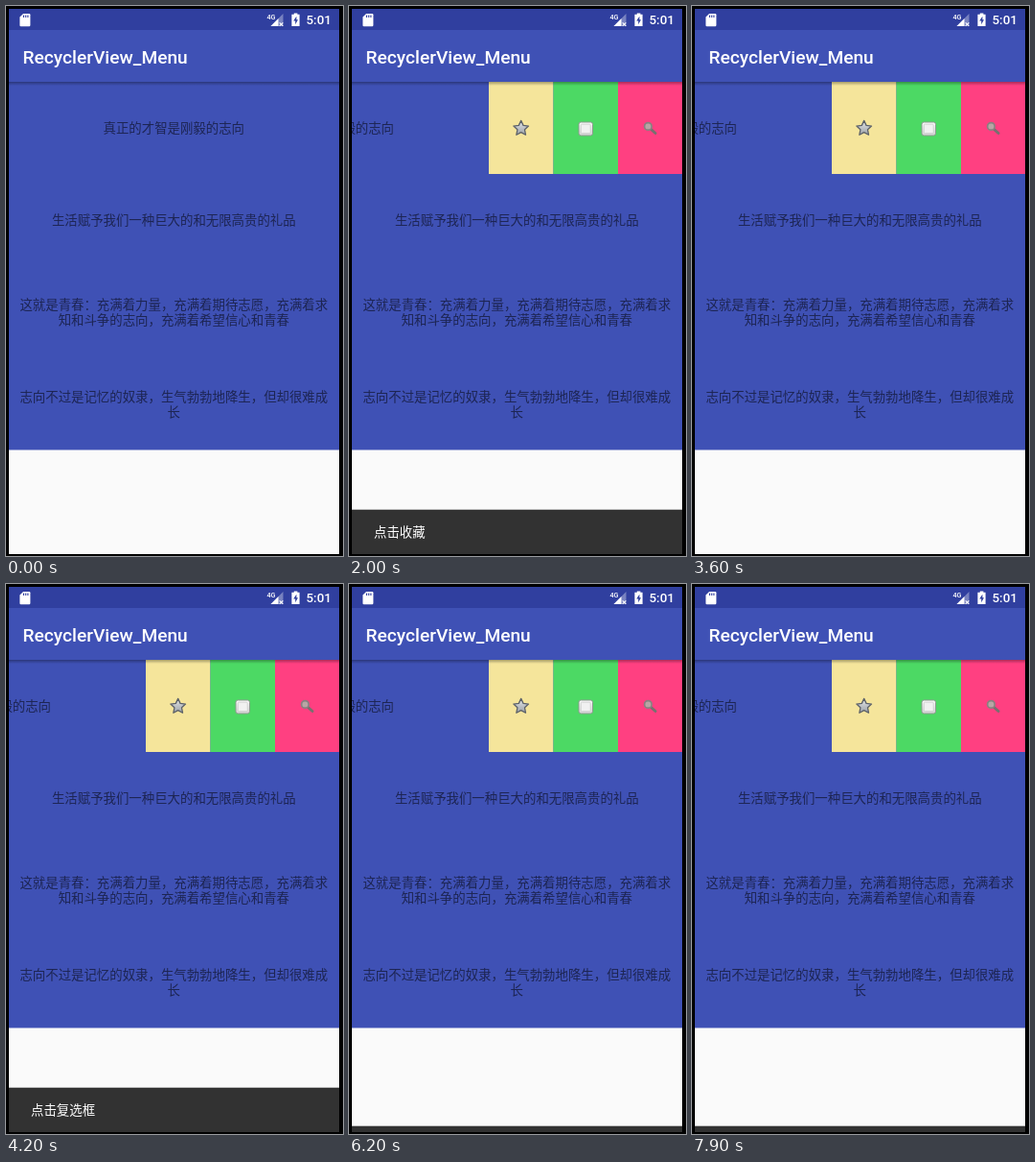
Animation, 352 px wide and 573 px high, one loop 8000 ms. Source, as an HTML page:

```html
<!DOCTYPE html>
<html lang="zh-CN">
<head>
<meta charset="utf-8">
<style>
  html, body { margin: 0; width: 100%; height: 100%; overflow: hidden; background: #000; }
  svg { display: block; }
  text { font-family: Roboto, "Noto Sans CJK SC", "Noto Sans CJK", sans-serif; }
  .item { font-size: 13.42px; fill: #1d2553; text-anchor: middle; }
  .bar { fill: #fff; font-weight: 500; }
</style>
</head>
<body>
<svg width="352" height="573" viewBox="0 0 352 573">
  <defs>
    <clipPath id="screen"><rect x="3" y="3" width="345" height="568"/></clipPath>
    <linearGradient id="shade" x2="0" y2="1">
      <stop offset="0" stop-color="#000" stop-opacity=".32"/>
      <stop offset="1" stop-color="#000" stop-opacity="0"/>
    </linearGradient>
    <linearGradient id="metal" x2="0" y2="1">
      <stop offset="0" stop-color="#e4e6e8"/>
      <stop offset="1" stop-color="#9ba1a8"/>
    </linearGradient>
    <linearGradient id="box" x2="0" y2="1">
      <stop offset="0" stop-color="#fafafa"/>
      <stop offset="1" stop-color="#d2d2d2"/>
    </linearGradient>
  </defs>
  <rect width="352" height="573"/>
  <g clip-path="url(#screen)">
    <rect x="3" y="3" width="345" height="568" fill="#fafafa"/>
    <rect x="3" y="79" width="345" height="383.5" fill="#3f51b5"/>

    <g id="row">
      <text class="item" x="175.3" y="132.2">真正的才智是刚毅的志向</text>
      <g transform="translate(348 79)">
        <rect width="67.5" height="96" fill="#f5e59b"/>
        <rect x="67.5" width="67.5" height="96" fill="#4cd964"/>
        <rect x="135" width="68" height="96" fill="#ff4081"/>
        <path id="star" fill="url(#metal)" stroke="#5d6268" stroke-width="1.3" stroke-linejoin="round"/>
        <rect x="94" y="42" width="14.5" height="14" rx="2.2" fill="url(#box)" stroke="#8b9a8e"/>
        <rect x="96.3" y="44.2" width="9.9" height="9.4" rx="1" fill="#f1f1f1" stroke="#c9c9c9" stroke-width=".7"/>
        <path d="M169.5 49.5L174 53.5" stroke="#77706f" stroke-width="3" stroke-linecap="round"/>
        <circle cx="166.4" cy="46.4" r="3.8" fill="#b9a5a5" stroke="#8a8080" stroke-width="1.7"/>
      </g>
    </g>

    <text class="item" x="175.3" y="228.2">生活赋予我们一种巨大的和无限高贵的礼品</text>
    <text class="item" x="175.3" y="316">这就是青春：充满着力量，充满着期待志愿，充满着求</text>
    <text class="item" x="175.3" y="331.8">知和斗争的志向，充满着希望信心和青春</text>
    <text class="item" x="175.3" y="411.8">志向不过是记忆的奴隶，生气勃勃地降生，但却很难成</text>
    <text class="item" x="175.3" y="427.8">长</text>

    <rect x="3" y="79" width="345" height="4" fill="url(#shade)"/>
    <rect x="3" y="25" width="345" height="54" fill="#3f51b5"/>
    <rect x="3" y="3" width="345" height="22" fill="#303f9f"/>
    <text class="bar" x="17.5" y="60" font-size="19.17">RecyclerView_Menu</text>

    <path d="M18 8H24.2Q25.4 8 25.4 9.2V20Q25.4 21.2 24.2 21.2H15.6Q14.4 21.2 14.4 20V11.6Z" fill="#fff"/>
    <path d="M18.5 9.5V12M20.7 9.5V12M22.9 9.5V12" stroke="#303f9f" stroke-width="1.1"/>
    <path d="M276.5 21L289.5 8V21Z" fill="#fff" opacity=".35"/>
    <path d="M276.5 21L284.5 13V21Z" fill="#fff"/>
    <path d="M285.7 17.3L289.3 20.9M289.3 17.3L285.7 20.9" stroke="#fff" stroke-width="1.1"/>
    <text class="bar" x="272.5" y="13.5" font-size="7.2">4G</text>
    <path d="M300.8 7.4H304.4V8.8H306.6V21H298.4V8.8H300.8Z" fill="#fff"/>
    <path d="M303.4 10.8L300.2 15.6H302.2V19.2L305 14.2H303.4Z" fill="#303f9f"/>
    <text class="bar" x="313.5" y="19" font-size="13.42">5:01</text>

    <g id="snack">
      <rect x="3" y="524.7" width="345" height="47" fill="#323232"/>
      <text id="note" x="26" y="553" font-size="13.42" fill="#fff"></text>
    </g>
  </g>
</svg>
<script>
const LOOP = 8000, HIDDEN = 47;
const $ = id => document.getElementById(id);
const row = $("row"), snack = $("snack"), note = $("note");

$("star").setAttribute("d", "M" + Array.from({ length: 10 }, (_, i) => {
  const r = i % 2 ? 4 : 8.2, a = i * Math.PI / 5;
  return (33.7 + r * Math.sin(a)).toFixed(2) + " " + (48.6 - r * Math.cos(a)).toFixed(2);
}).join("L") + "Z");

// [time, row offset]
const swipe = [[0, 0], [700, -42], [800, -118], [900, -184], [1000, -202]];

// [show time, hide time, message]
const notes = [
  [1800, 3400, "点击收藏"],
  [4000, 5600, "点击复选框"],
  [6200, 7800, "点击搜索"]
];

// [time, bar offset, text opacity, message]
const bar = [[0, HIDDEN, 0, ""]];
for (const [show, hide, msg] of notes) bar.push(
  [show, 40, 0, msg],
  [show + 100, 6, 0.5, msg],
  [show + 200, 0, 1, msg],
  [hide, 6.5, 0.9, msg],
  [hide + 100, 40, 0.1, msg],
  [hide + 200, HIDDEN, 0, msg]
);

const at = (steps, t) => steps.findLast(s => s[0] <= t);

function draw(t) {
  const [, y, alpha, msg] = at(bar, t);
  row.setAttribute("transform", `translate(${at(swipe, t)[1]} 0)`);
  snack.setAttribute("transform", `translate(0 ${y})`);
  note.setAttribute("opacity", alpha);
  if (note.textContent !== msg) note.textContent = msg;
}

const start = performance.now();
function tick() {
  draw((performance.now() - start) % LOOP);
  requestAnimationFrame(tick);
}
tick();
</script>
</body>
</html>
```
